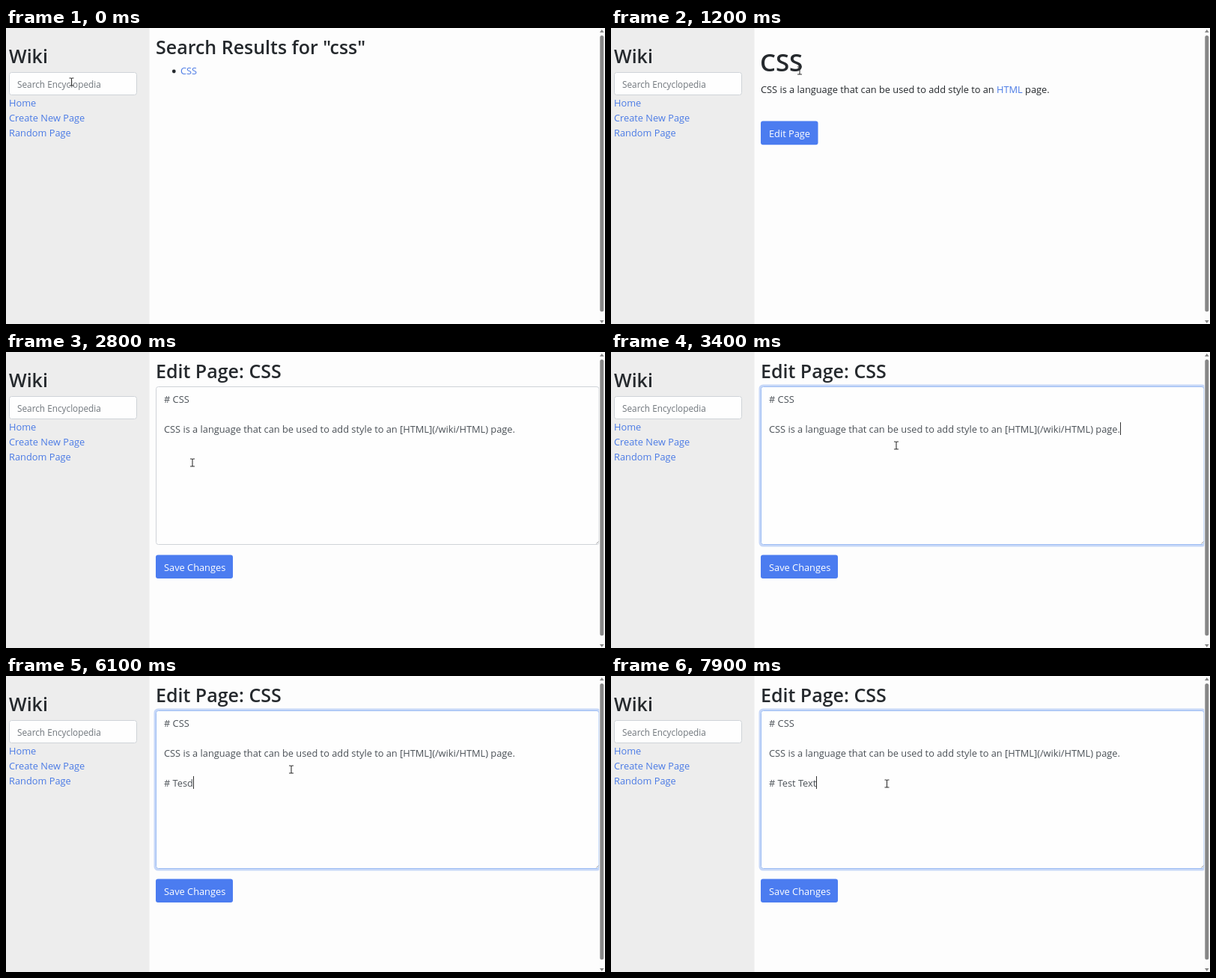
Animation of 800x396 px, one loop 8000 ms. Source, as an HTML page:

```html
<!DOCTYPE html>
<html lang="en">
<head>
<meta charset="utf-8">
<title>Wiki</title>
<style>
  html, body { margin: 0; width: 100%; height: 100%; overflow: hidden; background: #fdfdfd; }
  svg { display: block; width: 800px; height: 396px; }
  text {
    font: 12.8px "Open Sans", "Noto Sans", sans-serif;
    fill: #25292d;
    white-space: pre;
  }
  .h2 { font-size: 25px; font-weight: 600; }
  .h1 { font-size: 33px; font-weight: 600; }
  .hint { font-size: 11.8px; fill: #70767c; }
  .link { fill: #4b7be5; }
  .field { fill: #fefefe; stroke: #cfd3d8; }
  .button { fill: #4b7cf0; }
  .button.dark { fill: #395fbe; }
  .label { fill: #fff; }
  #editor text { fill: #4b5157; }
  #editor.focus .field { stroke: #9dbdf3; }
  .ring { fill: none; stroke: #c6d7f8; stroke-width: 3; visibility: hidden; }
  .focus .ring { visibility: visible; }
  #caret { stroke: #333; }
  #pointer { fill: none; stroke: #333; stroke-width: 1.1; }
  #pointer.faint { stroke: #8d8377; }
</style>
</head>
<body>
<svg viewBox="0 0 800 396">
  <defs>
    <clipPath id="view"><rect width="792.5" height="396"/></clipPath>
  </defs>
  <rect width="800" height="396" fill="#fdfdfd"/>

  <rect width="191.5" height="396" fill="#ededed"/>
  <text class="h2" x="4" y="47">Wiki</text>
  <rect class="field" x="4.5" y="59.5" width="170" height="30" rx="3"/>
  <text class="hint" x="15" y="79.5">Search Encyclopedia</text>
  <text class="link" x="4" y="105">Home</text>
  <text class="link" x="4" y="125">Create New Page</text>
  <text class="link" x="4" y="145">Random Page</text>

  <g id="results">
    <text class="h2" x="200" y="35">Search Results for "css"</text>
    <circle cx="224.3" cy="58" r="2.4" fill="#25292d"/>
    <text class="link" x="233" y="62">CSS</text>
  </g>

  <g id="entry">
    <text class="h1" x="199" y="58">CSS</text>
    <text x="200" y="87">CSS is a language that can be used to add style to an <tspan class="link">HTML</tspan> page.</text>
    <g id="edit">
      <rect class="ring" x="198.7" y="123.2" width="79" height="34.2" rx="4.5"/>
      <rect class="button" x="200" y="124.5" width="76.5" height="31.7" rx="3"/>
      <text class="label" x="211" y="146">Edit Page</text>
    </g>
  </g>

  <g id="editor" clip-path="url(#view)">
    <text class="h2" x="200" y="35" style="fill:#25292d">Edit Page: CSS</text>
    <rect class="ring" x="199" y="45" width="594.5" height="214" rx="4"/>
    <rect class="field" x="200.5" y="46.5" width="591.5" height="211" rx="3"/>
    <path d="M788.5 256.5l3-3" stroke="#888" stroke-width=".8"/>
    <text x="211" y="68"># CSS</text>
    <text id="body" x="211" y="108">CSS is a language that can be used to add style to an [HTML](/wiki/HTML) page.</text>
    <text id="typed" x="211" y="148"></text>
    <path id="caret" d="M.5-13v17"/>
    <rect class="button" x="200" y="271.5" width="103" height="31.5" rx="3"/>
    <text class="label" x="211" y="293" style="fill:#fff">Save Changes</text>
  </g>

  <path id="status" d="M0 393.5h88q2 0 2 2.500H0z" fill="#dcdcdc"/>

  <rect x="792.5" width="7.500" height="396" fill="#fbfbfb"/>
  <rect x="793.300" y="10" width="5" height="369.500" rx="2.500" fill="#868686"/>
  <path d="M793 6h5.600l-2.800-4zM793 391h5.600l-2.800 4z" fill="#868686"/>

  <path id="pointer" d="M-3-5h2q1 0 1 1 0-1 1-1h2M0-4v8M-3 5h2q1 0 1-1 0 1 1 1h2"/>
</svg>
<script>
  const LOOP = 8000, STEP = 100;
  const $ = id => document.getElementById(id);
  const show = (id, on) => $(id).style.visibility = on ? "inherit" : "hidden";

  // [time, x, y]
  const route = [
    [0, 87.5, 72], [100, 88, 72], [600, 246, 58], [900, 252, 57], [1200, 252, 57],
    [1700, 232, 150], [2300, 232, 149], [2500, 234, 149], [2800, 249, 148],
    [3300, 381, 125], [7400, 381, 125], [7800, 368.5, 144], [LOOP, 368.5, 144]
  ];

  // [time, line typed below the text]
  const typing = [
    [4300, "#"], [4700, "# "], [5200, "# T"], [5500, "# Te"], [5800, "# Tes"],
    [6000, "# Tesd"], [6400, "# Tes"], [6600, "# Test"], [6800, "# Test "],
    [7000, "# Test T"], [7200, "# Test Te"], [7400, "# Test Tex"], [7600, "# Test Text"]
  ];

  function pointerAt(t) {
    const i = route.findIndex(p => p[0] > t);
    const [t0, x0, y0] = route[i - 1], [t1, x1, y1] = route[i];
    const u = (t - t0) / (t1 - t0), e = u * u * (3 - 2 * u);
    return [x0 + (x1 - x0) * e, y0 + (y1 - y0) * e];
  }

  function placeCaret(t, typed) {
    const end = id => 211 + $(id).getComputedTextLength();
    let x = 211, y = 148;
    if (typed) x = end("typed");
    else if (t < 3800) { x = end("body"); y = 108; }
    else if (t < 4000) y = 128;
    $("caret").setAttribute("transform", `translate(${Math.round(x)} ${y - 1})`);
  }

  function draw(now) {
    const t = Math.floor(now % LOOP / STEP) * STEP;
    const page = t < 800 ? "results" : t < 2600 ? "entry" : "editor";
    for (const id of ["results", "entry", "editor"]) $(id).style.display = id === page ? "" : "none";

    const onButton = t >= 1600 && t < 2600;
    $("edit").classList.toggle("focus", t >= 2200);
    $("edit").querySelector(".button").classList.toggle("dark", onButton);
    show("status", t >= 2300 && t < 2600);

    const focus = t >= 3400;
    $("editor").classList.toggle("focus", focus);
    show("caret", focus);
    const typed = typing.reduce((line, [at, next]) => t >= at ? next : line, "");
    $("typed").textContent = typed;
    if (focus) placeCaret(t, typed);

    const [x, y] = pointerAt(t);
    $("pointer").setAttribute("transform", `translate(${x} ${y})`);
    $("pointer").classList.toggle("faint", onButton);
  }

  const start = performance.now();
  (function tick() {
    draw(performance.now() - start);
    requestAnimationFrame(tick);
  })();
</script>
</body>
</html>
```
